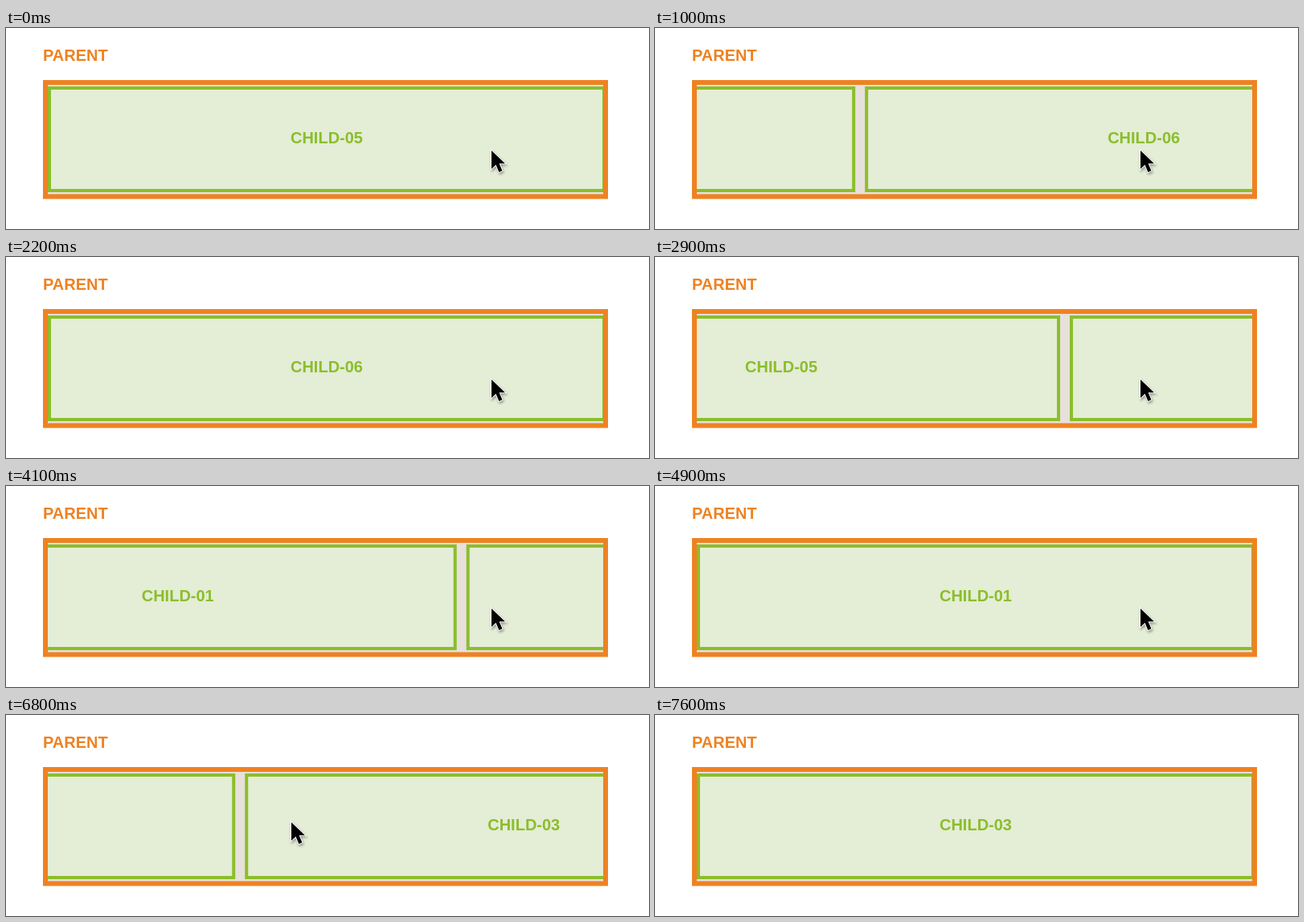
An HTML page for the animation above (7.7 s loop, 800 by 251 pixels).

```html
<!DOCTYPE html>
<html lang="en">
<head>
<meta charset="utf-8">
<title>Scroll snap</title>
<style>
  html, body { margin: 0; width: 100%; height: 100%; overflow: hidden; background: #fff; }
  svg { display: block; }
  text { font: bold 20px "Liberation Sans", Arial, sans-serif; }
  .parent { fill: #ee8222; }
  .child rect { fill: #e4edd5; stroke: #8bbe2b; stroke-width: 4; }
  .child text { fill: #8bbe2b; text-anchor: middle; }
  #cursor { filter: drop-shadow(1px 2px 1.5px rgba(0, 0, 0, .35)); }
</style>
</head>
<body>
<svg width="800" height="251" viewBox="0 0 800 251">
  <clipPath id="view"><path d="M52 71H743V207H52Z"/></clipPath>
  <text class="parent" x="46" y="40.5">PARENT</text>
  <path class="parent" d="M46 65H749V213.5H46Z"/>
  <path fill="#e8e0db" d="M52 71H743V207.5H52Z"/>
  <g clip-path="url(#view)"><g id="track"></g></g>
  <path id="cursor" d="M0 1V24L5.5 18.8L9.4 28L13.5 26.2L9.6 17.3H17Z"
        stroke="#fff" stroke-width="2" paint-order="stroke"/>
</svg>
<script>
const LOOP = 7700, STEP = 100, STRIDE = 706;
const track = document.getElementById('track');
const cursor = document.getElementById('cursor');

for (let i = 0; i < 6; i++) {
  track.innerHTML += `<g class="child" transform="translate(${i * STRIDE})">
    <rect x="54" y="75" width="690" height="128"/>
    <text x="399" y="144">CHILD-0${i + 1}</text></g>`;
}

// Scroll gestures: start, duration, change in cards
const swipes = [[700, 900, 1], [2805, 2070, -5], [4915, 1010, 1], [6500, 1010, 1]];

const progress = (t, start, length) => Math.min(1, Math.max(0, (t - start) / length));
const easeOut = u => 1 - (1 - u) ** 3;

function draw(t) {
  const card = swipes.reduce(
    (sum, [start, length, by]) => sum + by * easeOut(progress(t, start, length)), 4);
  track.setAttribute('transform', `translate(${-card * STRIDE})`);

  const across = progress(t, 5600, 400), leave = progress(t, 7200, 400);
  const x = 604 - 249 * across;
  const y = 152 - 19 * across + 85 * Math.sin(Math.PI * across) + 130 * leave;
  cursor.setAttribute('transform', `translate(${x} ${y})`);
}

let begin;
function tick(now) {
  begin ??= now;
  draw(Math.floor((now - begin) % LOOP / STEP) * STEP);
  requestAnimationFrame(tick);
}
draw(0);
requestAnimationFrame(tick);
</script>
</body>
</html>
```
